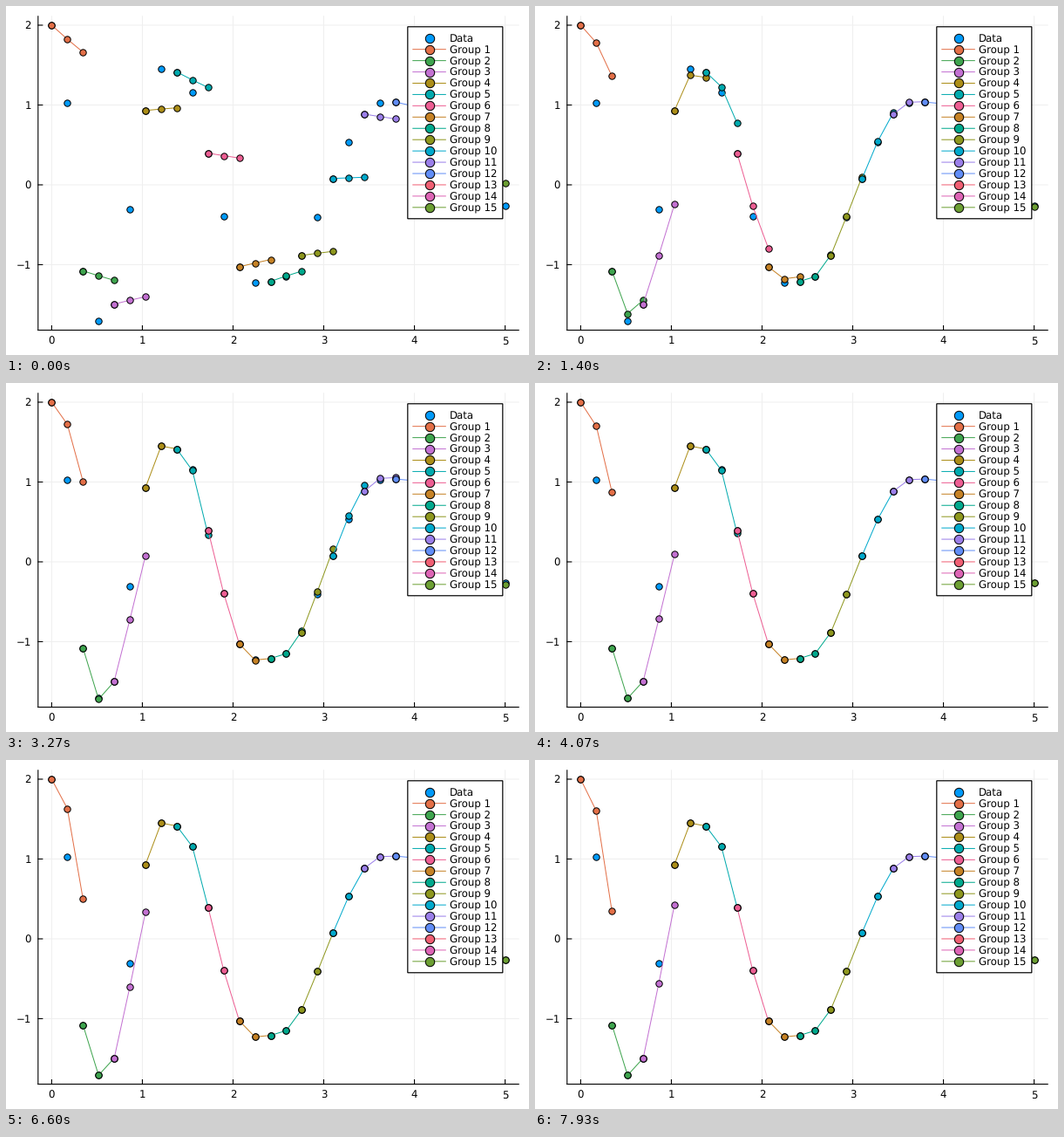
Write a matplotlib script that moves like this. It is 600 by 400 pixels and loops after 8000 ms.

```python
import numpy as np
import matplotlib.pyplot as plt
from matplotlib.animation import FuncAnimation
from matplotlib.patches import Rectangle

plt.rcParams["path.snap"] = False
plt.rcParams["text.hinting"] = "none"

W, H, DPI = 600, 400, 100
FRAMES, LOOP_MS = 120, 8000
PX = 72 / DPI  # points per pixel
TEXT = dict(family="DejaVu Sans", size=11.7 * PX, color="black", va="baseline")
LEFT, RIGHT, TOP, BOTTOM = 36.8, 588.2, 11.8, 371.5
PAD = 0.03 / 1.06  # margin on each side of the data, as a share of the axes

COLORS = ["#009afa", "#e36f47", "#3ea44e", "#c371d2", "#ac8e18", "#00aaae",
          "#ed5e93", "#c68225", "#00a98d", "#8e971e", "#00a9cc", "#9b7fe9",
          "#618df6", "#f05f73", "#dd64b5", "#6c9f33"]

# Untrained model: pixels that each group's line falls per sample
FIRST_STEP = [16, 5.6, -4.4, -1.6, 9.2, 2.9, -4.3, -6.1, -2.4, -0.7, 2.8, 4,
              2, 1, 0.3]
# Training: frame at which the error first vanishes, and width of its decay
RING = (20.5, 33)
RINGS = {2: (27, 25), 4: (32, 19), 5: (38, 36), 6: (32, 20), 7: (32, 22)}
# Groups that learn slowly: share of slow error, fade times of both points
SLOW = {1: (1, (360, 180)), 3: (0.62, (112, 112))}


def spiral(times, substeps=40):
    """First coordinate of the cubic spiral u' = A u^3, by Runge-Kutta."""
    A = np.array([[-0.1, -2.0], [2.0, -0.1]])
    f = lambda u: A @ u ** 3
    u, out = np.array([2.0, 0.0]), [2.0]
    h = (times[1] - times[0]) / substeps
    for _ in times[1:]:
        for _ in range(substeps):
            k1 = f(u)
            k2 = f(u + h / 2 * k1)
            k3 = f(u + h / 2 * k2)
            k4 = f(u + h * k3)
            u = u + h / 6 * (k1 + 2 * k2 + 2 * k3 + k4)
        out.append(u[0])
    return np.array(out)


times = np.linspace(0, 5, 30)
values = spiral(times)


def scale(v, data, lo, hi):
    """Map v so that the padded range of data fills lo to hi."""
    share = (v - data.min()) / (data.max() - data.min())
    return lo + (hi - lo) * (PAD + (1 - 2 * PAD) * share)


def to_x(t):
    return scale(t, times, LEFT, RIGHT)


def to_y(v):
    return scale(v, values, BOTTOM, TOP)


X, DATA = to_x(times), to_y(values)


def error_left(n, g, point):
    """Share of the first error that remains at frame n."""
    zero, width = RINGS.get(g, RING)
    share, fades = SLOW.get(g, (0, (1, 1)))
    ring = np.cos(np.pi * n / (2 * zero)) * np.exp(-(n / width) ** 2)
    return share * np.exp(-n / fades[point]) + (1 - share) * ring


def fit(n, g):
    """Heights of group g at frame n; its first point sits on the data."""
    goal = DATA[2 * g - 2:2 * g + 1]
    y = goal.copy()
    for i in range(1, len(goal)):
        start = goal[0] + FIRST_STEP[g - 1] * (1, 1.93)[i - 1]
        y[i] += (start - goal[i]) * error_left(n, g, i - 1)
    return y


fig = plt.figure(figsize=(W / DPI, H / DPI), dpi=DPI, facecolor="white")
ax = fig.add_axes([0, 0, 1, 1])
ax.set_xlim(0, W)
ax.set_ylim(H, 0)
ax.axis("off")


def line(x, y, color="black", z=2, width=1.1):
    ax.plot(x, y, color=color, lw=width * PX, zorder=z)


def dots(x, y, color, size=7.4, z=2, width=0):
    return ax.plot(x, y, color=color, lw=width * PX, marker="o",
                   ms=size * PX, mec="black", mew=PX, zorder=z)[0]


def draw_axes():
    for n in range(6):
        x = to_x(n)
        line([x, x], [TOP, BOTTOM], "#efefef", 1, 1)
        line([x, x], [BOTTOM, BOTTOM - 5])
        ax.text(x, 387.4, str(n), ha="center", **TEXT)
    for n in range(-1, 3):
        y = to_y(n)
        line([LEFT, RIGHT], [y, y], "#efefef", 1, 1)
        line([LEFT, LEFT + 5], [y, y])
        ax.text(29, y + 4.4, str(n).replace("-", "\u2212"), ha="right", **TEXT)
    line([LEFT, LEFT], [TOP, BOTTOM])
    line([LEFT, RIGHT], [BOTTOM, BOTTOM])


def draw_legend():
    right = RIGHT - (RIGHT - LEFT) / 30
    top = TOP + (BOTTOM - TOP) / 30
    left, row = right - 109, 12.94
    ax.add_patch(Rectangle((left, top), 109, 17 * row, fc="white", ec="black",
                           lw=1.2 * PX, zorder=5))
    for i, color in enumerate(COLORS):
        y = top + row * (i + 1)
        if i:
            line([left + 6, left + 43.5], [y, y], color, 6, 1)
        dots([left + 24.7], [y], color, 10.4, 7)
        ax.text(left + 48.2, y + 4.4, f"Group {i}" if i else "Data",
                zorder=7, **TEXT)


draw_axes()
dots(X, DATA, COLORS[0])
groups = {g: dots(X[2 * g - 2:2 * g + 1], fit(0, g), COLORS[g], width=1)
          for g in range(1, 16)}
draw_legend()


def update(n):
    for g, artist in groups.items():
        artist.set_ydata(fit(n, g))
    return list(groups.values())


anim = FuncAnimation(fig, update, frames=FRAMES, interval=LOOP_MS / FRAMES,
                     repeat=True, repeat_delay=0, blit=False)
plt.show()
```
